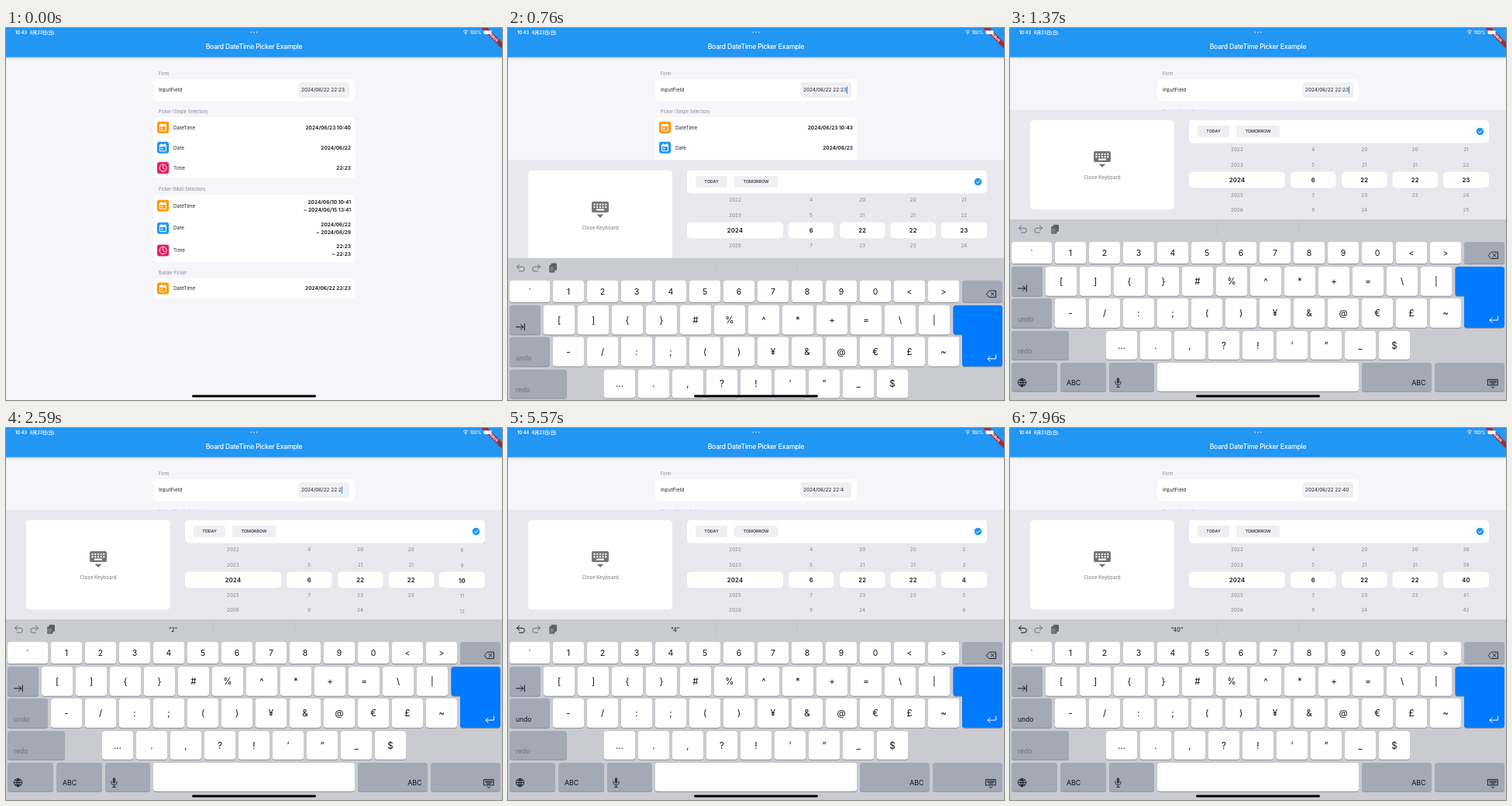
Write an HTML page that moves like this. It is 640 by 480 pixels and loops after 8 s.

```html
<!DOCTYPE html>
<html lang="en">
<head>
<meta charset="utf-8">
<title>Date picker with keyboard</title>
<style>
html, body { margin: 0; width: 100%; height: 100%; overflow: hidden; background: #f5f5fa; }
svg { display: block; width: 640px; height: 480px; }
text { font-family: Inter, Roboto, "Noto Sans CJK JP", "Noto Sans CJK", sans-serif; white-space: pre; }
</style>
</head>
<body>
<svg id="stage" viewBox="0 0 640 480"></svg>
<script>
const LOOP = 8000;
const BLUE = '#2196f3', INK = '#25252a', KEY = '#fff', SPECIAL = '#a3a9b5', DIM = '#6c7078';
const stage = document.getElementById('stage');

function el(parent, tag, attrs, content) {
  const node = document.createElementNS('http://www.w3.org/2000/svg', tag);
  for (const k in attrs) node.setAttribute(k, attrs[k]);
  if (content !== undefined) node.textContent = content;
  parent.append(node);
  return node;
}
const group = (parent, attrs = {}) => el(parent, 'g', attrs);
const box = (parent, x, y, width, height, rx, fill) =>
  el(parent, 'rect', { x, y, width, height, rx, fill });
const dot = (parent, cx, cy, r, fill) => el(parent, 'circle', { cx, cy, r, fill });
const line = (parent, d, stroke, width = 1) => el(parent, 'path', {
  d, stroke, fill: 'none', 'stroke-width': width, 'stroke-linecap': 'round', 'stroke-linejoin': 'round'
});
// y is the middle of the capitals
const label = (parent, x, y, size, str, fill = INK, anchor = 'start', weight = 400, spacing = 0) =>
  el(parent, 'text', {
    x, y: y + size * 0.36, fill, 'font-size': size, 'text-anchor': anchor,
    'font-weight': weight, 'letter-spacing': spacing
  }, str);

// ---- page ----
box(stage, 0, 0, 640, 480, 0, '#f5f5fa');
const page = group(stage);

function icon(y, color, clock) {
  box(page, 195, y - 7.5, 15.2, 15, 3.2, color);
  const g = group(page, { transform: `translate(202.6 ${y})` });
  if (clock) {
    line(g, 'M-4.6 0a4.6 4.6 0 1 0 9.2 0a4.6 4.6 0 1 0 -9.2 0M0 -2.6V.2L2 1.5', '#fff', 1);
  } else {
    line(g, 'M-3.8 -3.6h7.6v8h-7.6zM-2.2 -5v1.2M2.2 -5v1.2', '#fff', 1);
    box(g, -3.8, -3.6, 7.6, 2.4, 0, '#fff');
    box(g, -2.3, 0.3, 2, 2, 0, '#fff');
  }
}
const rowKinds = { DateTime: ['#ff9800', false], Date: [BLUE, false], Time: ['#e91e63', true] };
const value = (y, str) => label(page, 445, y, 6.5, str, INK, 'end', 700);

function row(y, kind, ...values) {
  icon(y, ...rowKinds[kind]);
  label(page, 216, y, 6.35, kind);
  return values.map((v, i) => value(y + (i - (values.length - 1) / 2) * 10, v));
}
function section(y, height, title) {
  label(page, 197, y - 7, 5.55, title, '#85858b');
  box(page, 190, y, 260, height, 5, '#fff');
}

section(66, 28.5, 'Form');
label(page, 197, 80, 6.5, 'InputField');
box(page, 377.5, 70, 65.5, 20, 4, '#efeff4');
const field = label(page, 381, 80, 6.45, '');
const cursor = box(page, 0, 75.3, 1.1, 9.4, 0.5, BLUE);

section(115, 79, 'Picker (Single Selection)');
const [singleStamp] = row(128.3, 'DateTime', '');
const [singleDate] = row(154.3, 'Date', '');
row(180.5, 'Time', '22:23');

section(215, 87, 'Picker (Multi Selection)');
row(229.3, 'DateTime', '2024/06/10 10:41', '~ 2024/06/15 13:41');
row(258.2, 'Date', '2024/06/22', '~ 2024/06/29');
row(287, 'Time', '22:23', '~ 22:23');

section(323, 26, 'Builder Picker');
row(336, 'DateTime', '2024/06/22 22:23');

// ---- header ----
const header = group(stage);
box(header, 0, 37, 640, 3, 0, 'rgba(0,0,0,.07)');
box(header, 0, 37, 640, 1.3, 0, 'rgba(0,0,0,.14)');
box(header, 0, 0, 640, 37.5, 0, BLUE);
label(header, 320, 24.2, 8.6, 'Board DateTime Picker Example', '#fff', 'middle', 500, -0.2);
const ribbon = group(header, { transform: 'translate(640 0) rotate(45)' });
box(ribbon, -30, 13.1, 60, 5.7, 0, '#a3283a');
label(ribbon, 0, 16, 4.6, 'DEBUG', '#fff', 'middle', 800);
const clock = label(header, 12, 5.6, 5.6, '', '#fff', 'start', 600);
label(header, 31, 5.6, 5.6, '6月23日(日)', '#fff', 'start', 600);
for (const x of [316.2, 320, 323.8]) dot(header, x, 5.6, 1, 'rgba(255,255,255,.6)');
line(header, 'M590.2 4.4a4.2 4.2 0 0 1 5.8 0M591.5 6a2.4 2.4 0 0 1 3.2 0', '#fff', 0.9);
dot(header, 593.1, 7.5, 0.8, '#fff');
label(header, 598.5, 5.6, 5.5, '100%', '#fff', 'start', 500);
box(header, 616.5, 3.2, 10, 4.8, 1.4, '#fff');

// ---- picker panel ----
const panel = group(stage);
box(panel, 0, 105.5, 640, 375, 0, '#e8e8ee');
box(panel, 26, 118.7, 186, 115.5, 5, '#fff');

function smallKeyboard(parent, x, y, s, color, hole) {
  const g = group(parent, { transform: `translate(${x} ${y}) scale(${s})` });
  box(g, -11, -7, 22, 14, 2, color);
  for (let r = 0; r < 2; r++)
    for (let c = 0; c < 5; c++) box(g, -8.5 + c * 3.7, -4.2 + r * 3.4, 2, 2, 0, hole);
  box(g, -5, 2.6, 10, 2, 0, hole);
  el(g, 'path', { d: 'M-4.4 9.5h8.8L0 14z', fill: color });
}
smallKeyboard(panel, 119, 166, 1, '#757578', '#fff');
label(panel, 119, 193, 6.3, 'Close Keyboard', '#77777b', 'middle');

box(panel, 231, 118.7, 387, 29.8, 5, '#fff');
const chip = (x, w, str) => {
  box(panel, x, 126, w, 15, 3, '#eeeef3');
  label(panel, x + w / 2, 133.5, 5.4, str, INK, 'middle', 500);
};
chip(242, 41, 'TODAY');
chip(292, 56, 'TOMORROW');
dot(panel, 606.5, 133.5, 4.8, BLUE);
line(panel, 'M604.2 133.6l1.7 1.7l3.2 -3.4', '#fff', 1);

const clip = el(panel, 'clipPath', { id: 'wheels' });
box(clip, 231, 149.5, 387, 98, 0, '#000');
const wheels = group(panel, { 'clip-path': 'url(#wheels)' });

function wheel(x, width, min, max) {
  box(wheels, x, 185.5, width, 20.8, 5, '#fff');
  const items = Array.from({ length: 7 }, () => label(wheels, x + width / 2, 0, 6, '', INK, 'middle'));
  return pos => {
    const near = Math.round(pos);
    items.forEach((item, i) => {
      const n = near + i - 3, on = n === near, size = on ? 7.5 : 6.1;
      item.textContent = n < min || n > max ? '' : n;
      item.setAttribute('y', 196 + (n - pos) * 19.6 + size * 0.36);
      item.setAttribute('font-size', size);
      item.setAttribute('font-weight', on ? 700 : 500);
      item.setAttribute('letter-spacing', on ? 0.25 : 0.2);
      item.setAttribute('fill', on ? INK : '#8f8f95');
    });
  };
}
wheel(231, 124, 1970, 2050)(2024);
wheel(362, 58.5, 1, 12)(6);
wheel(428, 58.5, 1, 30)(22);
wheel(493.5, 58.5, 0, 23)(22);
const minutes = wheel(559, 59, 0, 59);

// ---- keyboard ----
const board = group(stage);
box(board, 0, 247, 640, 240, 0, '#cacbd1');
for (const x of [267.5, 372]) box(board, x, 252, 0.8, 15, 0, '#bcbec4');

const bend = 'M3.2 -4.8L0 -1.8L3.2 1.2M0 -1.8H6.8a3 3 0 0 1 0 6H3';
const undoIcon = line(group(board, { transform: 'translate(11.5 260)' }), bend, DIM, 1);
line(group(board, { transform: 'translate(41.5 260) scale(-1 1)' }), bend, DIM, 1);
box(board, 55.5, 253.8, 7.5, 9, 1.2, '#5c5f66');
box(board, 53.3, 256, 7, 9.6, 1.2, '#5c5f66');
line(board, 'M55 259.5h3.4M55 261.5h3.4M55 263.3h2.4', '#cacbd1', 0.6);
const hints = [215.5, 320, 424].map(x => label(board, x, 260, 7.3, '', '#111', 'middle'));

function key(x, y, w, h, fill = KEY) {
  box(board, x, y + 1, w, h, 3.6, '#8b8e95');
  return box(board, x, y, w, h, 3.6, fill);
}
const keys = {};
function keyRow(x, y, h, size, chars) {
  [...chars].forEach((c, i) => {
    const kx = x + i * 44;
    keys[c] = key(kx, y, 40, h);
    label(board, kx + 20, y + h / 2, size, c, '#111', 'middle');
  });
}
key(2, 276, 52, 28);
label(board, 28, 290, 10.5, '`', '#111', 'middle');
keyRow(58, 276, 28, 10.5, '1234567890<>');
keyRow(46, 308, 37.8, 11.5, '[]{}#%^*+=\\|');
keyRow(58, 349, 37.8, 11.5, '-/:;()¥&@€£~');
keyRow(124, 391, 36.8, 11.5, '….,?!’”_$');
keys.back = key(586, 276, 52, 28, SPECIAL);
key(2, 308, 40, 37.8, SPECIAL);
key(2, 349, 52, 37.8, SPECIAL);
key(2, 391, 74, 36.8, SPECIAL);
key(2, 432, 59, 36.8, SPECIAL);
key(65, 432, 59, 36.8, SPECIAL);
key(128, 432, 58, 36.8, SPECIAL);
key(190, 432, 260, 36.8);
key(454, 432, 90, 36.8, SPECIAL);
key(548, 432, 90, 36.8, SPECIAL);
key(586, 340, 52, 46.8, '#007aff');
key(574.5, 308, 63.5, 37.8, '#007aff');
box(board, 586, 338, 52, 20, 0, '#007aff');

line(board, 'M617.5 293.3l3.6 -4.2h8.4v8.4h-8.4zM623.2 291.3l4 4M627.2 291.3l-4 4', '#1a1a1c', 0.9);
line(board, 'M10.5 336h9M16.5 332.8l3.2 3.2l-3.2 3.2M21.3 332v8', '#111', 1);
line(board, 'M629.5 372v5h-10.5M622 374l-3 3l3 3', '#fff', 1);
const undoText = label(board, 10, 376, 8.5, 'undo', DIM);
label(board, 10, 417, 8.5, 'redo', DIM);
label(board, 73, 458.3, 8.8, 'ABC', '#111');
label(board, 536.5, 458.3, 8.8, 'ABC', '#111', 'end');
line(board, 'M10.3 457.5a5.2 5.2 0 1 0 10.4 0a5.2 5.2 0 1 0 -10.4 0h10.4M15.5 452.3v10.4' +
  'M15.5 452.3q-5 5.2 0 10.4q5 -5.2 0 -10.4M11.5 454.6h8M11.5 460.4h8', '#111', 0.8);
box(board, 137.8, 451.3, 3.4, 7.4, 1.7, '#3a3c42');
line(board, 'M135.8 456v1a3.7 3.7 0 0 0 7.4 0v-1M139.5 460.8v2.4M137.5 463.4h4', '#111', 0.8);
line(board, 'M616.8 453.5h12.4v7.4h-12.4zM618.6 455.6h8.8M618.6 457.3h8.8M620.5 459.1h5M621.3 463l1.7 1.6l1.7 -1.6', '#111', 0.9);

box(stage, 240, 473.6, 160, 2.8, 1.4, '#000');

// ---- motion ----
const slideSteps = [0, 500, 590, 680, 760, 830, 900, 970, 1180];
// time, tail of the field text, minute, scroll duration, suggestions
const edits = [
  [870, '23', 23, 1, []],
  [2350, '2', 2, 415, ['“2”']],
  [3110, '', 0, 220, ['the', 'this', 'you']],
  [4920, '4', 4, 415, ['“4”']],
  [6310, '40', 40, 415, ['“40”']]
];
const presses = [['back', 2180, 2330], ['back', 2970, 3090], ['4', 4750, 4900], ['0', 6140, 6290]];

const spring = ms => ms <= 0 ? 1 : (1 + ms * 0.0175) * Math.exp(-ms * 0.0175);
const ease = p => (1 - Math.cos(Math.PI * Math.min(1, p))) / 2;

function blink(ms) {
  if (ms < 0) return 1;
  const p = ms % 1000;
  if (p < 500) return 1;
  if (p < 650) return 1 - (p - 500) / 150;
  return Math.max(0, (p - 850) / 150);
}

function setText(node, str) {
  if (node.textContent !== str) node.textContent = str;
}

function draw(t) {
  const held = slideSteps.filter(s => s <= t).pop();
  const up = held >= 1180 ? 0 : 1;
  panel.setAttribute('transform', `translate(0 ${375 * up * spring(held - 578)})`);
  board.setAttribute('transform', `translate(0 ${233 * up * spring(held - 594)})`);

  const focused = t >= 500;
  setText(singleStamp, focused ? '2024/06/23 10:43' : '2024/06/23 10:40');
  setText(singleDate, focused ? '2024/06/23' : '2024/06/22');

  const i = Math.max(0, edits.filter(e => e[0] <= t).length - 1);
  const [at, tail, minute, span, words] = edits[i];
  const from = i ? edits[i - 1][2] : minute;
  const run = Math.floor(Math.max(0, t - at) / 80) * 80;
  minutes(from + (minute - from) * ease(run / span));

  setText(field, '2024/06/22 22:' + tail);
  cursor.setAttribute('x', 381 + field.getComputedTextLength());
  cursor.setAttribute('opacity', focused ? blink(t - at) : 0);
  hints.forEach((h, n) => setText(h, words[n] || ''));

  const undoable = i >= 2;
  setText(clock, undoable ? '10:44' : '10:43');
  undoIcon.setAttribute('stroke', undoable ? '#111' : DIM);
  undoText.setAttribute('fill', undoable ? '#111' : DIM);

  for (const name of ['back', '4', '0']) {
    const down = presses.some(([k, a, b]) => k === name && t >= a && t < b);
    const special = name === 'back';
    keys[name].setAttribute('fill', down === special ? KEY : SPECIAL);
  }
}

const start = performance.now();
function frame() {
  draw((performance.now() - start) % LOOP);
  requestAnimationFrame(frame);
}
frame();
</script>
</body>
</html>
```
